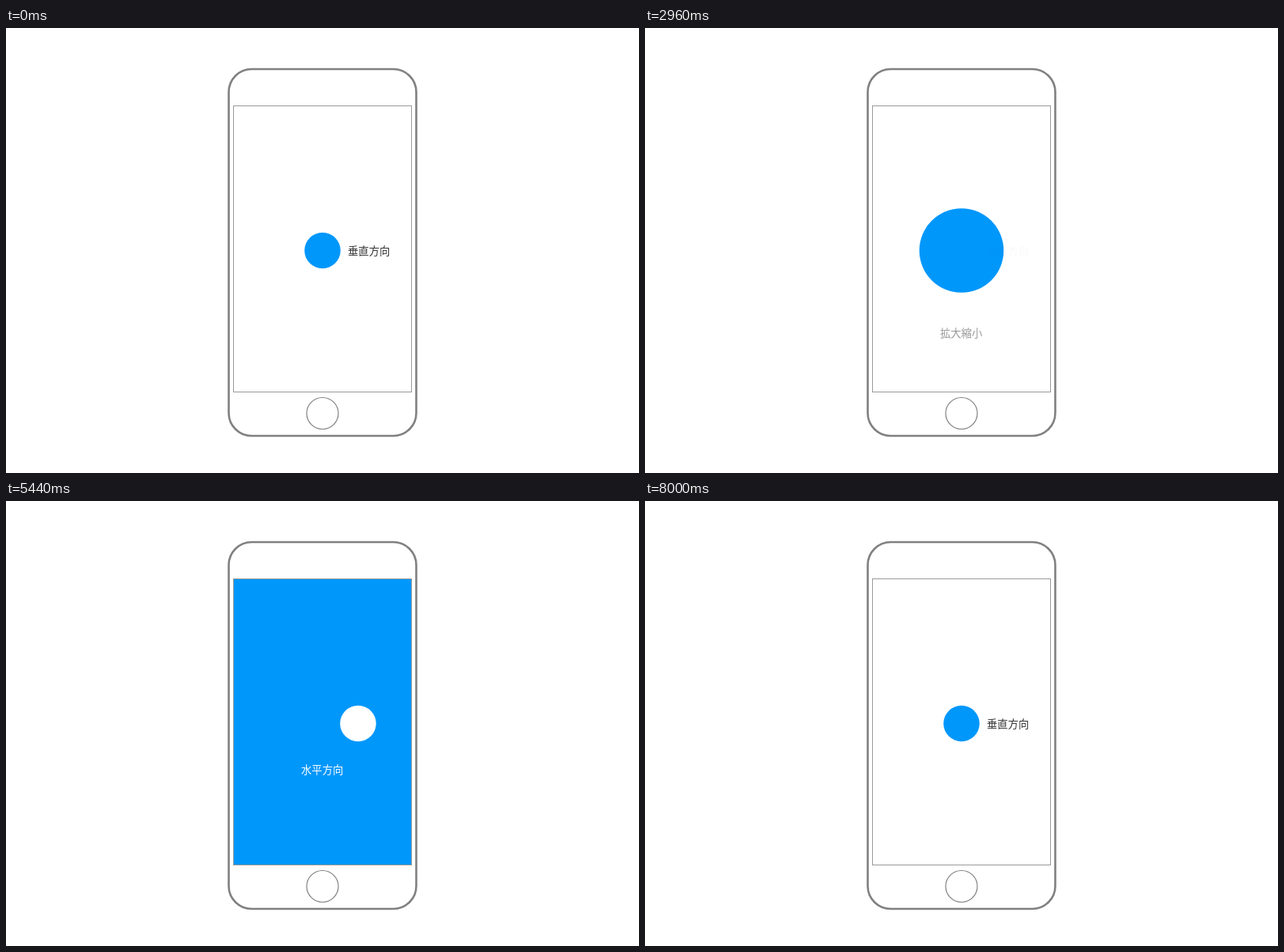
An HTML page for the animation above (8.56 s loop, 800 px wide and 563 px high).

```html
<!DOCTYPE html>
<html lang="ja">
<head>
<meta charset="utf-8">
<title>Spring motion</title>
<style>
  html, body { margin: 0; width: 100%; height: 100%; overflow: hidden; background: #fff; }
  svg { display: block; width: 100%; height: 100%; }
  text { font: 13.33px "Noto Sans CJK JP", "Noto Sans CJK", sans-serif; fill: #333; }
  .line { fill: none; stroke: #808080; }
  .blue { fill: #0097fb; }
  .white { fill: #fff; }
</style>
</head>
<body>
<svg viewBox="0 0 800 563">
  <clipPath id="screen"><rect x="287.5" y="98.5" width="225" height="362"/></clipPath>
  <rect class="line" x="281.5" y="52" width="237" height="464" rx="29" stroke-width="2.6"/>
  <circle class="line" cx="400" cy="487.5" r="20" stroke-width="1.2"/>
  <g clip-path="url(#screen)">
    <circle id="blueDisc" class="blue"/>
    <circle id="whiteDisc" class="white"/>
    <circle id="blueBall" class="blue"/>
    <text id="vertical" x="432" y="287">垂直方向</text>
    <text id="zoom" x="373" y="391">拡大縮小</text>
    <text id="horizontal" class="white" style="fill:#fff" x="373" y="345">水平方向</text>
  </g>
  <rect class="line" x="287.5" y="98.5" width="225" height="362" stroke-width="1" style="stroke:#999"/>
</svg>
<script>
const LOOP = 8560, STEP = 40;
const REST = 22.75, FILL = 400;
const TO_BLUE = 4100, TO_WHITE = 6640;

// Each entry: [start time, new target].
const MOVE_Y = [[950, -96.5], [1611, 100], [2230, 0]];
const MOVE_X = [[4790, 65], [5407, -64], [6008, 0]];
const RADIUS = [[2892, 84], [3500, 31], [TO_BLUE, REST]];
const CAPTIONS = {
  vertical: [[2600, 0], [7080, 1]],
  zoom: [[2892, 1], [TO_BLUE, 0]],
  horizontal: [[4790, 1], [TO_WHITE, 0]]
};

const el = id => document.getElementById(id);
const clamp = v => Math.min(1, Math.max(0, v));

// Step response of a spring with damping ratio 0.5.
function spring(ms) {
  if (ms <= 0) return 0;
  const x = 0.019 * ms, w = Math.sqrt(0.75);
  return 1 - Math.exp(-x / 2) * (Math.cos(w * x) + Math.sin(w * x) / (2 * w));
}

function follow(track, start, t) {
  let value = start, from = start;
  for (const [time, target] of track) {
    value += (target - from) * spring(t - time);
    from = target;
  }
  return value;
}

function circle(id, x, y, r, opacity) {
  const node = el(id);
  node.setAttribute("cx", x);
  node.setAttribute("cy", y);
  node.setAttribute("r", Math.max(0, r));
  node.setAttribute("opacity", clamp(opacity));
}

function draw(t) {
  const x = 400 + follow(MOVE_X, 0, t);
  const y = 281.5 + follow(MOVE_Y, 0, t);
  const r = follow(RADIUS, REST, t);
  const toBlue = spring(t - TO_BLUE), toWhite = spring(t - TO_WHITE);

  circle("blueDisc", 400, y, Math.max(r, FILL * toBlue), 1);
  circle("whiteDisc", x, y, Math.max(r, FILL * toWhite), toBlue);
  circle("blueBall", x, y, r, toWhite);

  for (const id in CAPTIONS) {
    const start = id === "vertical" ? 1 : 0;
    el(id).setAttribute("opacity", clamp(follow(CAPTIONS[id], start, t)));
  }
}

const began = performance.now();
function tick() {
  const t = (performance.now() - began) % LOOP;
  draw(Math.floor(t / STEP) * STEP);
  requestAnimationFrame(tick);
}
tick();
</script>
</body>
</html>
```
